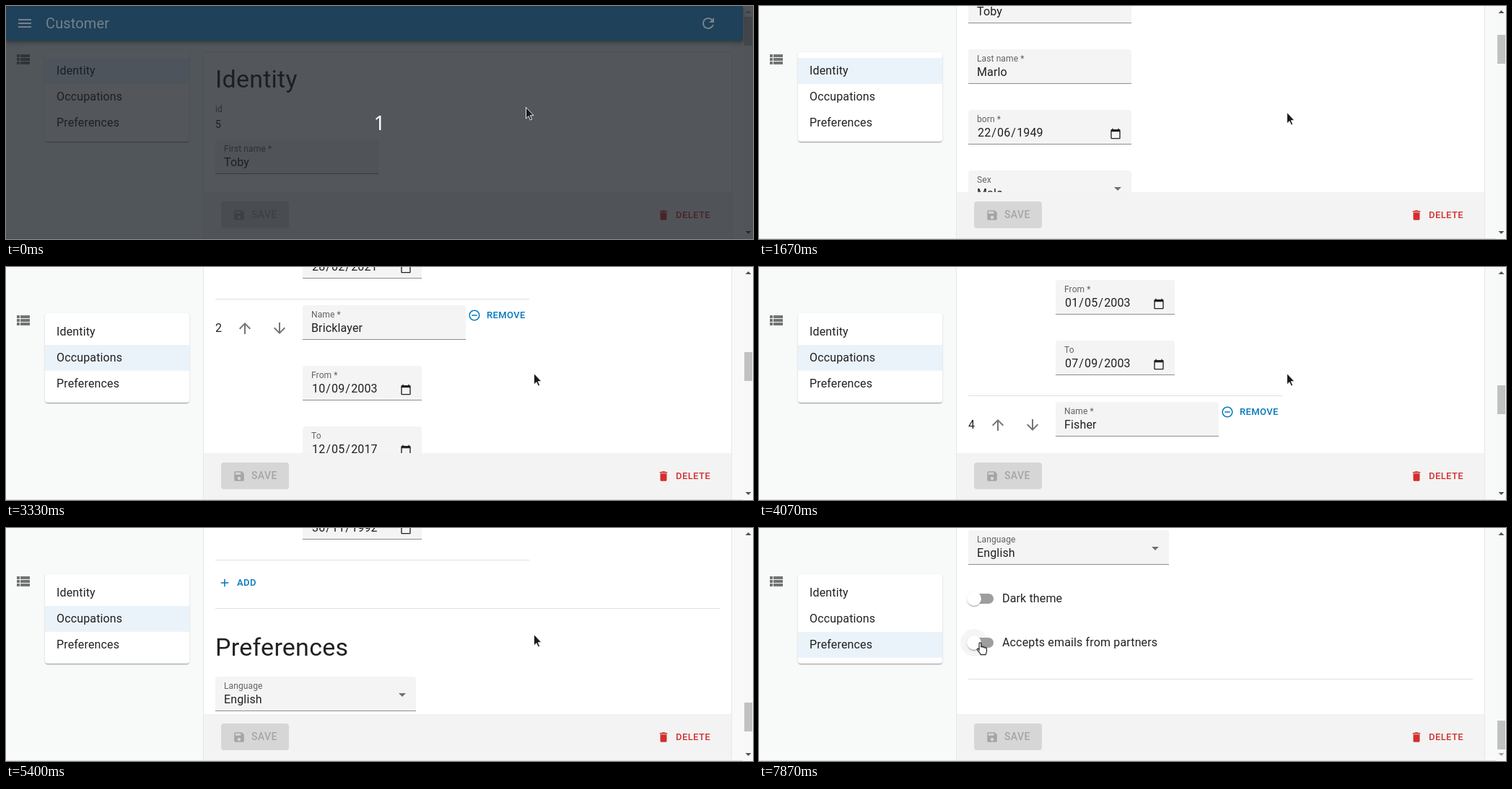
Recreate the animation shown at these times as an HTML page. Size 1035 by 323 pixels, loop 8000 ms.

```html
<!DOCTYPE html>
<html lang="en">
<head>
<meta charset="utf-8">
<title>Customer form</title>
<style>
  html, body { margin: 0; width: 100%; height: 100%; overflow: hidden; }
  #stage {
    position: relative; width: 1035px; height: 323px; overflow: hidden;
    background: #f8faf9; color: rgba(0,0,0,.87);
    font: 16px/24px Roboto, sans-serif; letter-spacing: .15px; white-space: nowrap;
  }
  #stage div, #stage svg { position: absolute; }
  svg { fill: currentColor; overflow: visible; }
  #page { left: 0; top: 0; width: 1021px; height: 2380px; }
  .panel { left: 273px; top: 64px; width: 731px; height: 2330px; background: #fff; border: 1px solid #e6e9e8; }
  .title { left: 290px; font-size: 34px; line-height: 42px; letter-spacing: .25px; }
  .rule { left: 290px; height: 1px; background: #e0e0e0; }
  .small { font-size: 12px; line-height: 16px; letter-spacing: .11px; color: rgba(0,0,0,.6); }
  .field { height: 47px; background: #f4f4f4; border-radius: 4px 4px 0 0; border-bottom: 1px solid #8c8c8c; }
  .field .small { left: 12px; top: 5px; }
  .value { left: 12px; top: 20px; }
  .value span { padding: 0 1px; }
  .button { font-weight: 500; font-size: 13px; letter-spacing: .4px; }
  .remove { color: #0277bd; }
  .icon { color: rgba(0,0,0,.54); }
  .off { color: rgba(0,0,0,.26); }
  .track { left: 291px; width: 34px; height: 14px; border-radius: 7px; background: #9e9e9e; }
  .knob { left: 288px; width: 20px; height: 20px; border-radius: 50%; background: #fff;
    box-shadow: 0 2px 1px -1px rgba(0,0,0,.2), 0 1px 1px rgba(0,0,0,.14), 0 1px 3px rgba(0,0,0,.12); }
  #halo { left: 279px; top: 2197px; width: 38px; height: 38px; border-radius: 50%; background: rgba(0,0,0,.04); }
  #menu { left: 54px; top: 64px; width: 200px; height: 124px; background: #fff; border-radius: 4px;
    box-shadow: 0 2px 1px -1px rgba(0,0,0,.2), 0 1px 1px rgba(0,0,0,.14), 0 1px 3px rgba(0,0,0,.12); }
  #menu div { left: 0; width: 184px; height: 36px; padding-left: 16px; line-height: 35px; }
  #menu .on { background: #ebf3fa; }
  #footer { left: 274px; top: 258px; width: 731px; height: 65px; background: #f3f3f3; }
  #save { left: 24px; top: 13px; width: 94px; height: 36.5px; border-radius: 4px; background: #d6d6d6; color: #a5a5a5;
    font-size: 14px; line-height: 36.5px; }
  #delete { left: 654px; top: 19.5px; color: #d32f2f; }
  #edge { left: 0; top: 322px; width: 1021px; height: 1px; background: #d3dcda; }
  #header { left: 0; top: 0; width: 1021px; height: 48px; background: #0277bd; color: #fff;
    box-shadow: 0 2px 4px -1px rgba(0,0,0,.2), 0 4px 5px rgba(0,0,0,.14), 0 1px 10px rgba(0,0,0,.12); }
  #header div { left: 55px; top: 12px; font-size: 20px; }
  #bar { left: 1021px; top: 0; width: 14px; height: 323px; background: #f8f8f8; color: #505050; }
  #bar .end { color: #a3a3a3; }
  #thumb { left: 2px; top: 15px; width: 11px; height: 40px; background: #c1c1c1; }
  #shade { inset: 0; background: rgba(26,31,38,.75); }
  #count { left: 0; top: 141px; width: 1035px; text-align: center; color: #fff;
    font: 28px/40px "Noto Sans", sans-serif; }
  #shade, #count { visibility: hidden; }
  .dim #shade, .dim #count { visibility: visible; }
  .dim #header { z-index: 1; background: #1f4159; color: #74818c; }
</style>
</head>
<body>
<div id="stage">
  <div id="page"></div>
  <div id="menu"></div>
  <div id="footer">
    <div id="save" class="button"></div>
    <div id="delete" class="button"></div>
  </div>
  <div id="edge"></div>
  <div id="header"><div>Customer</div></div>
  <div id="bar">
    <svg id="up" width="14" height="15"><path d="M3.5 10l4-4 4 4z"/></svg>
    <div id="thumb"></div>
    <svg id="down" width="14" height="15" style="top:308px"><path d="M3.5 4l4 4 4-4z"/></svg>
  </div>
  <div id="shade"></div>
  <div id="count">1</div>
  <svg id="arrow" width="12" height="19"><path d="M.5 .5V16L4 12.7 6.4 18 8.7 17 6.3 11.7H11z" fill="#1b1b1b" stroke="#fff" stroke-width=".9"/></svg>
  <svg id="hand" width="16" height="19"><path d="M4 11V2.2a1.4 1.4 0 0 1 2.8 0V7.5a1.3 1.3 0 0 1 2.6 0v.5a1.3 1.3 0 0 1 2.6.3v.5a1.2 1.2 0 0 1 2.4.4V13c0 2-1.2 2.6-1.4 4.6H6.2C5.6 15.5 3 13.4 1.4 11 .6 9.6 2.2 8.6 3.2 9.8z" fill="#fff" stroke="#222" stroke-width="1.2"/></svg>
</div>
<script>
const $ = id => document.getElementById(id);

const icons = {
  list: 'M3 14h4v-4H3v4zm0 5h4v-4H3v4zM3 9h4V5H3v4zm5 5h13v-4H8v4zm0 5h13v-4H8v4zM8 5v4h13V5H8z',
  menu: 'M3 18h18v-2H3v2zm0-5h18v-2H3v2zm0-7v2h18V6H3z',
  refresh: 'M17.65 6.35C16.2 4.9 14.21 4 12 4c-4.42 0-7.99 3.58-7.99 8s3.57 8 7.99 8c3.73 0 6.84-2.55 7.73-6h-2.08c-.82 2.33-3.04 4-5.65 4-3.31 0-6-2.69-6-6s2.69-6 6-6c1.66 0 3.14.69 4.22 1.78L13 11h7V4l-2.35 2.35z',
  save: 'M17 3H5c-1.1 0-2 .9-2 2v14c0 1.1.9 2 2 2h14c1.1 0 2-.9 2-2V7l-4-4zm-5 16c-1.66 0-3-1.34-3-3s1.34-3 3-3 3 1.34 3 3-1.34 3-3 3zm3-10H5V5h10v4z',
  trash: 'M6 19c0 1.1.9 2 2 2h8c1.1 0 2-.9 2-2V7H6v12zM19 4h-3.5l-1-1h-5l-1 1H5v2h14V4z',
  minus: 'M7 11v2h10v-2H7zm5-9C6.48 2 2 6.48 2 12s4.48 10 10 10 10-4.48 10-10S17.52 2 12 2zm0 18c-4.41 0-8-3.59-8-8s3.59-8 8-8 8 3.59 8 8-3.59 8-8 8z',
  plus: 'M19 13h-6v6h-2v-6H5v-2h6V5h2v6h6v2z',
  up: 'M4 12l1.41 1.41L11 7.83V20h2V7.83l5.58 5.59L20 12l-8-8-8 8z',
  down: 'M20 12l-1.41-1.41L13 16.17V4h-2v12.17l-5.58-5.59L4 12l8 8 8-8z',
  drop: 'M7 10l5 5 5-5z',
  date: 'M20 3h-1V1h-2v2H7V1H5v2H4c-1.1 0-2 .9-2 2v16c0 1.1.9 2 2 2h16c1.1 0 2-.9 2-2V5c0-1.1-.9-2-2-2zm0 18H4V8h16v13z'
};

// Builders; icons are placed by their centre
const icon = (name, x, y, size = 24, cls = '') =>
  `<svg class="${cls}" viewBox="0 0 24 24" width="${size}" height="${size}"
    style="left:${x - size / 2}px;top:${y - size / 2}px"><path d="${icons[name]}"/></svg>`;
const box = (cls, style, html = '') => `<div class="${cls}" style="${style}">${html}</div>`;
const text = (x, y, html, cls = '') => box(cls, `left:${x}px;top:${y}px`, html);
const title = (y, html) => box('title', `top:${y - 21}px`, html);
const rule = (y, w) => box('rule', `top:${y}px;width:${w}px`);
const button = (x, y, name, label) =>
  text(x, y, icon(name, 9, 12, 18) + text(26, 0, label), 'button remove');

function field(x, y, w, label, value, kind) {
  if (kind === 'date') value = value.split('/').map(p => `<span>${p}</span>`).join('/');
  let mark = '';
  if (kind === 'date') mark = icon('date', w - 22, 33, 16);
  if (kind === 'select') mark = icon('drop', w - 19, 24.5, 24, 'icon');
  return box('field', `left:${x}px;top:${y}px;width:${w}px`,
    text(12, 5, label, 'small') + box('value', '', value) + mark);
}

function toggle(y, label) {
  return box('track', `top:${y - 7}px`) + box('knob', `top:${y - 10}px`) + text(337, y - 12.5, label);
}

const jobs = [
  ['Construction manager', '13/05/2017', '28/02/2021'],
  ['Bricklayer', '10/09/2003', '12/05/2017'],
  ['Postman', '01/05/2003', '07/09/2003'],
  ['Fisher', '02/12/1992', '16/04/2003'],
  ['Farmer', '12/03/1984', '30/11/1992']
];

function job([name, from, to], i) {
  const y = 642 + 253 * i;
  return text(290, y + 20, i + 1)
    + icon('up', 331, y + 32, 24, i ? 'icon' : 'off')
    + icon('down', 379, y + 32, 24, i < jobs.length - 1 ? 'icon' : 'off')
    + field(411, y, 226, 'Name *', name)
    + button(640, y + 1.5, 'minus', 'REMOVE')
    + field(411, y + 84, 165, 'From *', from, 'date')
    + field(411, y + 168, 165, 'To', to, 'date')
    + rule(y + 244, 435);
}

$('page').innerHTML = box('panel', '')
  + title(101, 'Identity')
  + text(290, 135, 'id', 'small')
  + box('', 'left:290px;top:152px;font-size:14px', '5')
  + field(290, 185, 226, 'First name *', 'Toby')
  + field(290, 269, 226, 'Last name *', 'Marlo')
  + field(290, 353, 226, 'born *', '22/06/1949', 'date')
  + field(290, 437, 226, 'Sex', 'Male', 'select')
  + rule(515, 699) + title(569, 'Occupations')
  + jobs.map(job).join('')
  + button(294, 1918, 'plus', 'ADD')
  + rule(1965, 699) + title(2019, 'Preferences')
  + field(290, 2060, 278, 'Language', 'English', 'select')
  + toggle(2155, 'Dark theme')
  + '<div id="halo"></div>'
  + toggle(2216, 'Accepts emails from partners')
  + rule(2266, 699);

$('menu').innerHTML = ['Identity', 'Occupations', 'Preferences']
  .map((name, i) => box('', `top:${8 + 36 * i}px`, name)).join('');
$('menu').insertAdjacentHTML('beforebegin', icon('list', 24, 74, 24, 'icon'));
$('header').innerHTML += icon('menu', 26, 24) + icon('refresh', 973, 24);
$('save').innerHTML = icon('save', 25, 18.5, 18) + text(42, 0, 'SAVE');
$('delete').innerHTML = icon('trash', -17, 12, 18) + text(0, 0, 'DELETE');

// Keys are [tick, values...], with 15 ticks per second
const scrollKeys = [
  [16, 0], [25, 209], [26, 209], [32, 372], [33, 372], [35, 426], [36, 426], [39, 508],
  [41, 582], [42, 582], [48, 805], [49, 805], [55, 1028], [56, 1065], [57, 1065],
  [61, 1214], [62, 1214], [72, 1512], [74, 1610], [75, 1610], [79, 1805], [80, 1805],
  [83, 1951], [87, 1951], [91, 2022], [92, 2022], [94, 2049], [96, 2049], [97, 2057]
];
const mouseKeys = [
  [0, 720, 140], [1, 720, 143], [8, 720, 143], [9, 727, 146], [10, 727, 146], [11, 731, 147],
  [102, 731, 147], [106, 600, 152], [109, 400, 161], [112, 289, 160],
  [115, 302, 153], [116, 302, 153], [117, 304, 156], [118, 306, 158]
];
const maxScroll = 2057;

function at(keys, tick) {
  const i = keys.findIndex(k => k[0] > tick);
  if (i === 0) return keys[0].slice(1);
  if (i < 0) return keys[keys.length - 1].slice(1);
  const a = keys[i - 1], b = keys[i], p = (tick - a[0]) / (b[0] - a[0]);
  return a.slice(1).map((v, n) => Math.round(v + (b[n + 1] - v) * p));
}

const move = (id, x, y) => { $(id).style.transform = `translate(${x}px,${y}px)`; };
const show = (id, on) => { $(id).style.visibility = on ? 'visible' : 'hidden'; };

function draw() {
  const time = performance.now() % 8000;
  const tick = Math.floor((time + 4) * 15 / 1000);
  const [scroll] = at(scrollKeys, tick);
  const [x, y] = at(mouseKeys, tick);

  $('stage').classList.toggle('dim', time < 70);
  move('page', 0, -scroll);
  move('thumb', 0, Math.floor(scroll / maxScroll * 252.5));
  $('up').classList.toggle('end', scroll === 0);
  $('down').classList.toggle('end', scroll === maxScroll);

  const hide = Math.min(1, Math.max(0, (tick - 20) / 3));
  move('header', 0, -64 * hide * hide);

  const section = scroll > 1905 ? 2 : scroll > 460 ? 1 : 0;
  [...$('menu').children].forEach((el, i) => el.classList.toggle('on', i === section));

  const pointing = tick > 102 && x < 552;
  show('arrow', !pointing);
  show('hand', pointing);
  show('halo', pointing && x < 336);
  move('arrow', x, y);
  move('hand', x - 5, y);
  requestAnimationFrame(draw);
}
draw();
</script>
</body>
</html>
```
